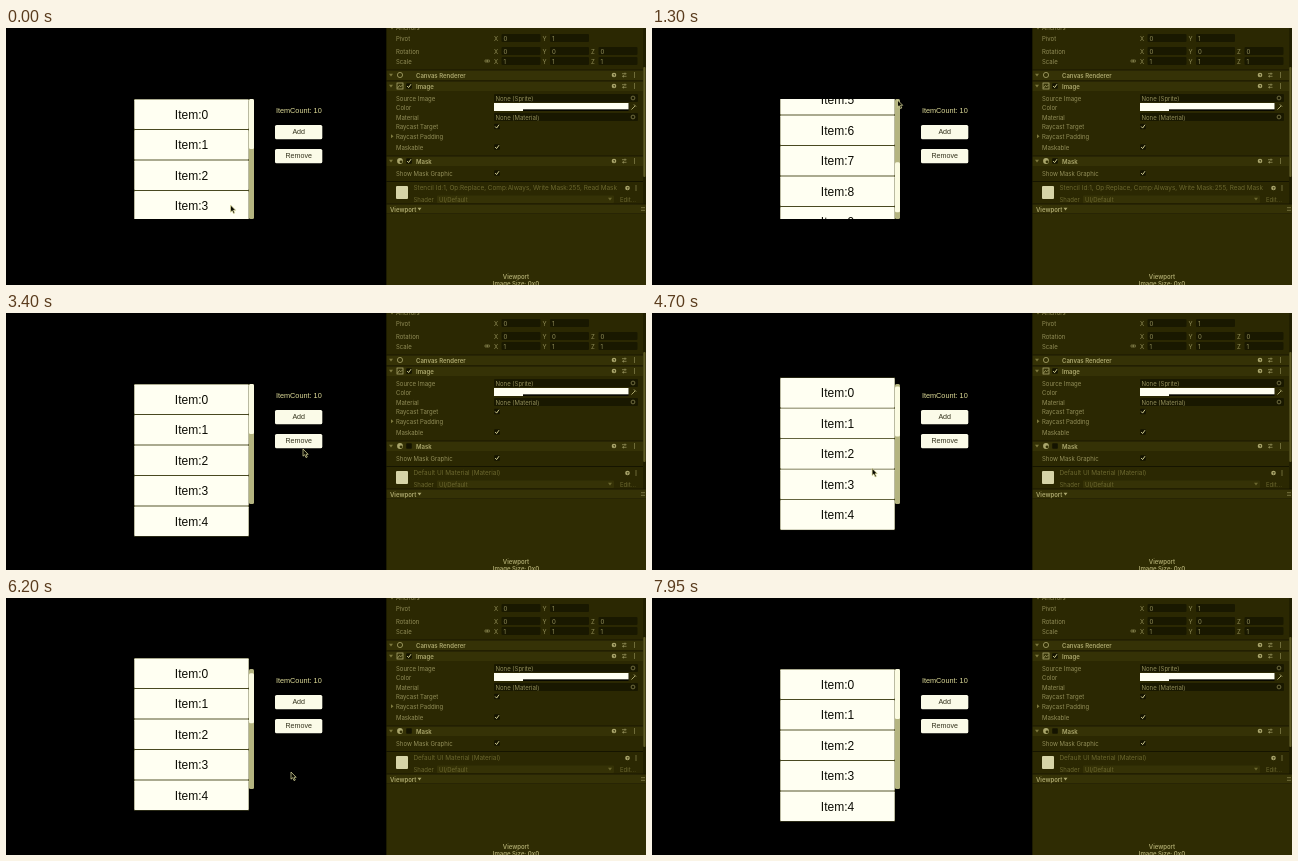
Write an HTML page that moves like this. It is 640 px wide and 257 px high and loops after 8 s.

```html
<!DOCTYPE html>
<html lang="en">
<head>
<meta charset="utf-8">
<title>Virtual list with mask</title>
<style>
  html, body { margin: 0; width: 100%; height: 100%; overflow: hidden; background: #000; }
  svg { display: block; width: 100vw; height: 100vh; }
  text { dominant-baseline: central; }
  .ui { font: 6px Inter, sans-serif; fill: #918d58; }
  .ui .head { font-weight: 600; fill: #aaa66c; }
  .ui .dim { fill: #6b672f; }
  .game { font-family: "Liberation Sans", Arial, sans-serif; text-anchor: middle; }
  .item { font-size: 12px; fill: #0c0c04; }
  .btn { font-size: 7.1px; fill: #33321c; }
</style>
</head>
<body>
<svg id="stage" viewBox="0 0 640 257" preserveAspectRatio="none">
  <defs>
    <clipPath id="view"><rect x="128" y="71" width="115" height="120"/></clipPath>
    <clipPath id="pane"><rect x="380" width="260" height="257"/></clipPath>
  </defs>
  <rect width="640" height="257"/>
  <g id="game" class="game">
    <rect x="128" y="71" width="115" height="120" fill="#2a2800"/>
    <g id="list"></g>
    <rect x="243" y="71" width="5" height="120" rx="1.5" fill="#b4b480"/>
    <rect id="handle" x="243" width="5" rx="1.5" fill="#fbfbe2"/>
  </g>
  <g id="panel" class="ui" clip-path="url(#pane)"></g>
  <path id="cursor" d="M0 0V7.2L1.7 5.7L3 8.6L4.3 8L3 5.3H5.2Z" fill="#0a0a00" stroke="#e4e2a4" stroke-width=".7"/>
</svg>
<script>
const LOOP = 8000, STEP = 50, TOP = 71, VIEW = 120, ROW = 30.5, COUNT = 10, POOL = 5;
const MAX = ROW * COUNT - VIEW, MASK_OFF = 2900;
const $ = id => document.getElementById(id);

function add(parent, tag, attrs, content) {
  const el = document.createElementNS("http://www.w3.org/2000/svg", tag);
  for (const key in attrs) el.setAttribute(key, attrs[key]);
  if (content !== undefined) el.textContent = content;
  parent.append(el);
  return el;
}

const panel = $("panel"), game = $("game");
const box = (x, y, width, height, fill, more) => add(panel, "rect", { x, y, width, height, fill, ...more });
const label = (x, y, s, cls = "", more) => add(panel, "text", { x, y, class: cls, ...more }, s);
const line = (d, stroke = "#918d58", width = .8) =>
  add(panel, "path", { d, stroke, "stroke-width": width, fill: "none" });
const arrow = (x, y, fill = "#7d793f") => add(panel, "path", { d: `M${x - 2} ${y - 1.2}h4l-2 2.6z`, fill });

function check(x, y) {
  box(x - 2.8, y - 2.8, 5.6, 5.6, "#141300", { rx: .8 });
  return line(`M${x - 1.8} ${y}l1.4 1.6l2.4 -3.4`, "#d0cc8e", 1);
}

function header(y, name) {
  box(380, y - 5, 257, 10, "#353206");
  line(`M380 ${y - 5}h257`, "#151400");
  arrow(385, y);
  label(410, y, name, "head");
  tools(y, 608);
}

function tools(y, x) {
  add(panel, "circle", { cx: x, cy: y, r: 2.3, fill: "#aaa66c" });
  label(x, y + .1, "?", "", { "text-anchor": "middle", style: "font-size:4px;font-weight:700;fill:#2b2802" });
  line(`M${x + 8} ${y - 1.3}h4.5M${x + 8} ${y + 1.3}h4.5M${x + 11} ${y - 2.4}v2.2M${x + 9.5} ${y + .2}v2.2`);
  dots(x + 20.5, y);
}

function dots(x, y) {
  for (const k of [-2, 0, 2]) box(x - .5, y + k - .5, 1, 1, "#aaa66c");
}

function vector(y, name, values) {
  label(390, y, name);
  values.forEach((v, i) => {
    const x = 488 + i * 48.5;
    label(x, y, "XYZ"[i]);
    box(x + 7.5, y - 4, 39, 8, "#191800", { rx: 1 });
    label(x + 9.5, y, v);
  });
}

function objectField(y, name, value) {
  label(390, y, name);
  box(488, y - 4, 144, 8, "#191800", { rx: 1 });
  label(489.5, y, value);
  add(panel, "circle", { cx: 627, cy: y, r: 1.9, fill: "none", stroke: "#918d58", "stroke-width": .7 });
}

function toggle(y, name) {
  label(390, y, name);
  check(491, y);
}

function buildPanel() {
  box(380, 0, 260, 257, "#2b2802");
  label(390, -.5, "Anchors");
  arrow(386, 0);
  vector(10, "Pivot", [0, 1]);
  vector(23, "Rotation", [0, 0, 0]);
  vector(33, "Scale", [1, 1, 1]);
  line("M479 32h2.4v2h-2.4zM481 32h2.4v2h-2.4z", "#918d58", .6);

  header(47, "Canvas Renderer");
  add(panel, "circle", { cx: 394, cy: 47, r: 2.6, fill: "none", stroke: "#aaa66c", "stroke-width": .8 });
  header(58, "Image");
  box(391, 55, 6, 6, "none", { stroke: "#aaa66c", "stroke-width": .8 });
  line("M391.5 60l2 -2.5l1.3 1.2l2 -2", "#aaa66c");
  check(403, 58);

  objectField(70, "Source Image", "None (Sprite)");
  label(390, 79, "Color");
  box(488, 75, 134.5, 8, "#080800");
  box(488, 75, 134.5, 6.3, "#fffff2");
  box(488, 81, 29, 2, "#fffff2");
  line("M625.5 81.5l3.5 -3.5M628 76.5l2 2", "#aaa66c", 1);
  objectField(89, "Material", "None (Material)");
  toggle(98.5, "Raycast Target");
  add(panel, "path", { d: "M385 106.3v4l2.5 -2z", fill: "#7d793f" });
  label(390, 108.5, "Raycast Padding");
  toggle(119, "Maskable");

  header(133, "Mask");
  add(panel, "circle", { cx: 394, cy: 133, r: 2.9, fill: "#aaa66c" });
  add(panel, "circle", { cx: 395, cy: 133.8, r: 1.4, fill: "#353206" });
  const mark = check(403, 133);
  toggle(145, "Show Mask Graphic");

  line("M380 153.5h257", "#151400", 1);
  box(390, 158, 12, 13, "#d6d4a8", { rx: 1 });
  const title = label(407.5, 160, "", "dim", { style: "font-size:6.4px" });
  add(panel, "circle", { cx: 621.5, cy: 160, r: 2.3, fill: "#aaa66c" });
  label(621.5, 160.1, "?", "", { "text-anchor": "middle", style: "font-size:4px;font-weight:700;fill:#2b2802" });
  dots(630, 160);
  label(407.5, 171, "Shader", "dim");
  box(431, 167.5, 177, 7.5, "#353206", { rx: 1 });
  label(433, 171, "UI/Default", "dim");
  arrow(604, 171, "#6b672f");
  label(614, 171, "Edit...", "dim");

  box(637, 0, 3, 176, "#211f00");
  box(637.3, 39, 2.2, 110, "#605c26", { rx: 1 });
  box(380, 176, 260, 10, "#353206");
  line("M380 176h260M380 186h260", "#151400");
  label(384, 181, "Viewport", "head");
  arrow(413.5, 181, "#aaa66c");
  line("M635 179.7h4M635 182.3h4", "#918d58", .7);
  box(380, 186, 260, 71, "#2f2c03");
  label(510, 248, "Viewport", "head", { "text-anchor": "middle" });
  label(510, 255, "Image Size: 0x0", "head", { "text-anchor": "middle" });
  line("M380.3 0v257", "#151400", .8);
  return { mark, title };
}

function buildGame() {
  add(game, "text", { x: 292.8, y: 82, "font-size": 7.3, fill: "#dedb98" }, "ItemCount: 10");
  [["Add", 97], ["Remove", 121]].forEach(([s, y]) => {
    add(game, "rect", { x: 269, y, width: 47.3, height: 14.3, rx: 1.6, fill: "#fbfbe8" });
    add(game, "text", { x: 292.7, y: y + 7.3, class: "btn" }, s);
  });
  return Array.from({ length: POOL }, () => {
    const g = add($("list"), "g", {});
    add(g, "rect", { x: 128, width: 115, height: ROW, fill: "#55542c" });
    add(g, "rect", { x: 128.4, y: .4, width: 114.2, height: ROW - .8, rx: .8, fill: "#fffff2" });
    const name = add(g, "text", { x: 185.5, y: 15.6, class: "item" });
    return { g, name };
  });
}

// Monotone cubic through [time, value] points.
function track(...pts) {
  const slope = pts.slice(1).map((p, i) => (p[1] - pts[i][1]) / (p[0] - pts[i][0]));
  const tangent = pts.map((_, i) => {
    const a = slope[i - 1] || 0, b = slope[i] || 0;
    return a * b > 0 ? 2 * a * b / (a + b) : 0;
  });
  return t => {
    if (t <= pts[0][0]) return pts[0][1];
    const i = pts.findIndex(p => p[0] >= t) - 1;
    if (i < 0) return pts[pts.length - 1][1];
    const [t0, a] = pts[i], [t1, b] = pts[i + 1], h = t1 - t0, u = (t - t0) / h, v = 1 - u;
    return v * v * (1 + 2 * u) * a + u * u * (3 - 2 * u) * b
      + h * u * v * (v * tangent[i] - u * tangent[i + 1]);
  };
}

const scrollAt = track([350, 0], [1050, 204], [1200, 204], [1300, 167], [1850, -10], [2050, -10],
  [2250, -3], [2450, 0], [4600, 0], [5300, 164], [5450, 194], [5650, 204], [5900, 204],
  [6200, 11], [6700, -20], [6900, -20], [7300, 0]);
const cursorX = track([350, 224.5], [1050, 244], [1200, 244], [1300, 245.5], [1850, 262], [2050, 262],
  [2250, 320], [2800, 403], [2950, 403], [3400, 297], [3750, 235], [4500, 215], [5250, 250],
  [5900, 262], [6200, 285], [6700, 290]);
const cursorY = track([350, 177], [1050, 4], [1200, 4], [1300, 72], [1850, 245], [2050, 245],
  [2250, 192], [2800, 132], [2950, 132], [3400, 136], [3750, 165], [4600, 165], [5250, -12],
  [5650, -45], [5900, -45], [6200, 174], [6550, 264]);

const { mark, title } = buildPanel();
const rows = buildGame();

function draw(t) {
  const scroll = scrollAt(t), masked = t < MASK_OFF;
  const first = Math.max(0, Math.min(COUNT - POOL, Math.floor(scroll / ROW)));
  rows.forEach(({ g, name }, i) => {
    g.setAttribute("transform", `translate(0 ${TOP + (first + i) * ROW - scroll})`);
    name.textContent = "Item:" + (first + i);
  });

  const inside = Math.max(0, Math.min(MAX, scroll));
  const size = 50 - Math.abs(scroll - inside) * .4;
  $("handle").setAttribute("y", TOP + (VIEW - size) * inside / MAX);
  $("handle").setAttribute("height", size);

  $("list").setAttribute("clip-path", masked ? "url(#view)" : "none");
  mark.style.display = masked ? "" : "none";
  title.textContent = masked
    ? "Stencil Id:1, Op:Replace, Comp:Always, Write Mask:255, Read Mask"
    : "Default UI Material (Material)";
  $("cursor").setAttribute("transform", `translate(${cursorX(t)} ${cursorY(t)})`);
}

const start = performance.now();
function tick() {
  const t = (performance.now() - start) % LOOP;
  draw(Math.floor(t / STEP) * STEP);
  requestAnimationFrame(tick);
}
tick();
</script>
</body>
</html>
```
